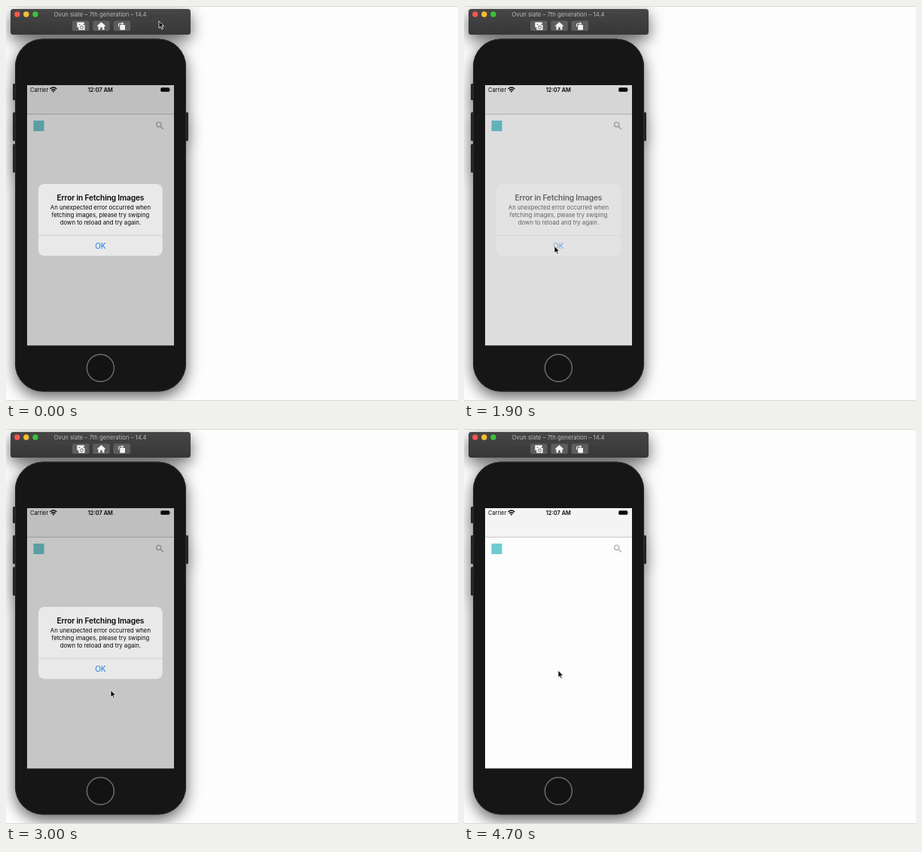
Write an HTML page that moves like this. It is 600 by 524 pixels and loops after 5.1 s.

```html
<!DOCTYPE html>
<html lang="en">
<head>
<meta charset="utf-8">
<title>Error alert</title>
<style>
  html, body { margin: 0; width: 100%; height: 100%; overflow: hidden; background: #fdfdfd; }
  svg { display: block; width: 600px; height: 524px; }
  text { font-family: Inter, Roboto, sans-serif; }
  .mid { text-anchor: middle; }
  .msg { font-size: 7.78px; }
</style>
</head>
<body>
<svg viewBox="0 0 600 524">
  <defs>
    <linearGradient id="barFill" x2="0" y2="1">
      <stop offset="0" stop-color="#464646"/>
      <stop offset="1" stop-color="#373737"/>
    </linearGradient>
    <filter id="shadow" filterUnits="userSpaceOnUse" x="-60" y="-60" width="400" height="660">
      <feDropShadow dx="0" dy="7" stdDeviation="10" flood-color="#000" flood-opacity=".62"/>
    </filter>
  </defs>

  <rect width="600" height="524" fill="#fdfdfd"/>

  <!-- device and toolbar -->
  <g filter="url(#shadow)">
    <rect x="6" y="4" width="239" height="34" rx="3.5" fill="url(#barFill)"/>
    <g fill="#262627">
      <rect x="9" y="103" width="6" height="22" rx="1.5"/>
      <rect x="9" y="141" width="6" height="38" rx="1.5"/>
      <rect x="9" y="183" width="6" height="38" rx="1.5"/>
      <rect x="236" y="141" width="6" height="38" rx="1.5"/>
    </g>
    <rect x="12" y="43.5" width="227" height="468" rx="37" fill="#161617"/>
  </g>
  <rect x="12.5" y="44" width="226" height="467" rx="36.5" fill="none" stroke="#29292a"/>
  <circle cx="125.4" cy="480.3" r="18" fill="#131314" stroke="#6c6c6c" stroke-width="1.5"/>
  <path d="M0 .5H600M0 523.5H600" stroke="#d9d9d9"/>

  <circle cx="14.8" cy="11" r="3.7" fill="#f4564e"/>
  <circle cx="26.8" cy="11" r="3.7" fill="#f5bd30"/>
  <circle cx="38.9" cy="11" r="3.7" fill="#3dc03f"/>
  <text class="mid" x="125" y="14" font-size="7.74" fill="#b9b9b9">Ovun slate – 7th generation – 14.4</text>

  <g fill="#5d5d5d">
    <rect x="88" y="19.5" width="22.5" height="13.5" rx="2"/>
    <rect x="115.3" y="19.5" width="22.5" height="13.5" rx="2"/>
    <rect x="142.6" y="19.5" width="22.5" height="13.5" rx="2"/>
  </g>
  <g fill="#f4f4f4">
    <path d="M94.3 21.5h9.5v2.4h-7v4.3h-2.5z"/>
    <path d="M96.3 25h1.8l1-1.4h2.7l1 1.4h1.8v6.7h-8.3z"/>
    <circle cx="100.5" cy="28.2" r="1.9" fill="#f4f4f4" stroke="#5d5d5d" stroke-width=".9"/>
    <path d="M126.5 21.3l5.6 5-.8.9-.8-.7v5h-2.7v-3.2h-2.6v3.2h-2.7v-5l-.8.7-.8-.9z"/>
    <rect x="151.2" y="25" width="6.8" height="6.7" rx=".8"/>
    <path d="M149.6 27.6v-3.1q0-1.3 1.3-1.3h3.4" fill="none" stroke="#f4f4f4" stroke-width="1.1"/>
    <path d="M153.6 21.2l2.9 2-2.9 2z"/>
  </g>

  <!-- app screen -->
  <rect x="28" y="105" width="195" height="345.3" fill="#fdfdfd"/>
  <rect x="28" y="105" width="195" height="38.5" fill="#f4f4f4"/>
  <path d="M28 143.5h195" stroke="#c3c3c3" stroke-width=".9"/>
  <rect x="36.5" y="152" width="14" height="14" fill="#70cad2"/>
  <g fill="none" stroke="#bdbdbd" stroke-width="1.6">
    <circle cx="202.7" cy="157.3" r="3.1"/>
    <path d="M205 159.6l3.7 3.7" stroke-width="1.9"/>
  </g>
  <rect id="dim" x="28" y="105" width="195" height="345.3"/>

  <g fill="#080808">
    <text x="32" y="113.6" font-size="7.4">Carrier</text>
    <text class="mid" x="125.3" y="113.6" font-size="7.45" font-weight="600">12:07 AM</text>
    <g fill="none" stroke="#080808" stroke-width="1.4">
      <path d="M58.5 110.1q4.4-4 8.8 0M60.2 112q2.7-2.4 5.4 0"/>
    </g>
    <path d="M61.4 113.1q1.5-1.2 3 0l-1.5 1.6z"/>
    <rect x="205.3" y="108.2" width="11.8" height="5.6" rx="1.5"/>
    <path d="M217.8 109.8q1.3 1.2 0 2.4z"/>
  </g>

  <g id="alert">
    <rect x="43" y="236" width="164.7" height="95.5" rx="8" fill="#e9e9ea"/>
    <path d="M43 304.3h164.7" stroke="#c9c9ca" stroke-width=".8"/>
    <g class="mid" fill="#080808">
      <text x="125.4" y="258" font-size="10.2" font-weight="600" letter-spacing="-.15">Error in Fetching Images</text>
      <text class="msg" x="125.4" y="270.2">An unexpected error occurred when</text>
      <text class="msg" x="125.4" y="280">fetching images, please try swiping</text>
      <text class="msg" x="125.4" y="289.7">down to reload and try again.</text>
      <text x="125.4" y="321.6" font-size="10" fill="#147be4">OK</text>
    </g>
  </g>

  <path id="cursor" d="M0 0V9.3L2.2 7.3 3.7 10.8 5.3 10.1 3.8 6.7H6.7Z"
    fill="#060606" stroke="#fff" stroke-width=".8" stroke-linejoin="round"/>
</svg>

<script>
const LOOP = 5100, STEP = 100;
const dim = document.getElementById('dim');
const alertBox = document.getElementById('alert');
const cursor = document.getElementById('cursor');

// [time, x, y] of the pointer tip
const route = [
  [0, 203, 20], [100, 208, 38], [200, 205, 95], [300, 188, 170], [400, 162, 243],
  [500, 140, 291], [600, 129, 309], [1100, 120, 318.5], [2200, 120, 318.5],
  [2500, 125.5, 400.5], [2700, 130, 416], [2800, 133, 415], [3000, 139, 346.5],
  [3200, 132, 326], [3500, 125, 319.8], [4500, 125, 320.3], [LOOP, 125, 320.5]
];

function smooth(t, from, to) {
  const p = Math.min(1, Math.max(0, (t - from) / (to - from)));
  return p * p * (3 - 2 * p);
}

function pointer(t) {
  const i = route.findIndex(k => k[0] > t);
  const [t0, x0, y0] = route[i - 1], [t1, x1, y1] = route[i];
  const p = (t - t0) / (t1 - t0);
  return [x0 + (x1 - x0) * p, y0 + (y1 - y0) * p];
}

function draw(t) {
  const shown = 1 - smooth(t, 1750, 2083) + smooth(t, 2550, 2800) - smooth(t, 4150, 4483);
  const entering = t > 2500 && t < 2800;
  const scale = entering ? 1 + 0.08 * (1 - shown) : 1;
  dim.setAttribute('opacity', 0.22 * shown);
  alertBox.setAttribute('opacity', shown);
  alertBox.setAttribute('transform',
    `translate(125.4 283.8) scale(${scale}) translate(-125.4 -283.8)`);
  cursor.setAttribute('transform', `translate(${pointer(t)})`);
}

const start = performance.now();
function tick() {
  const t = (performance.now() - start) % LOOP;
  draw(Math.floor(t / STEP) * STEP);
  requestAnimationFrame(tick);
}
draw(0);
requestAnimationFrame(tick);
</script>
</body>
</html>
```
